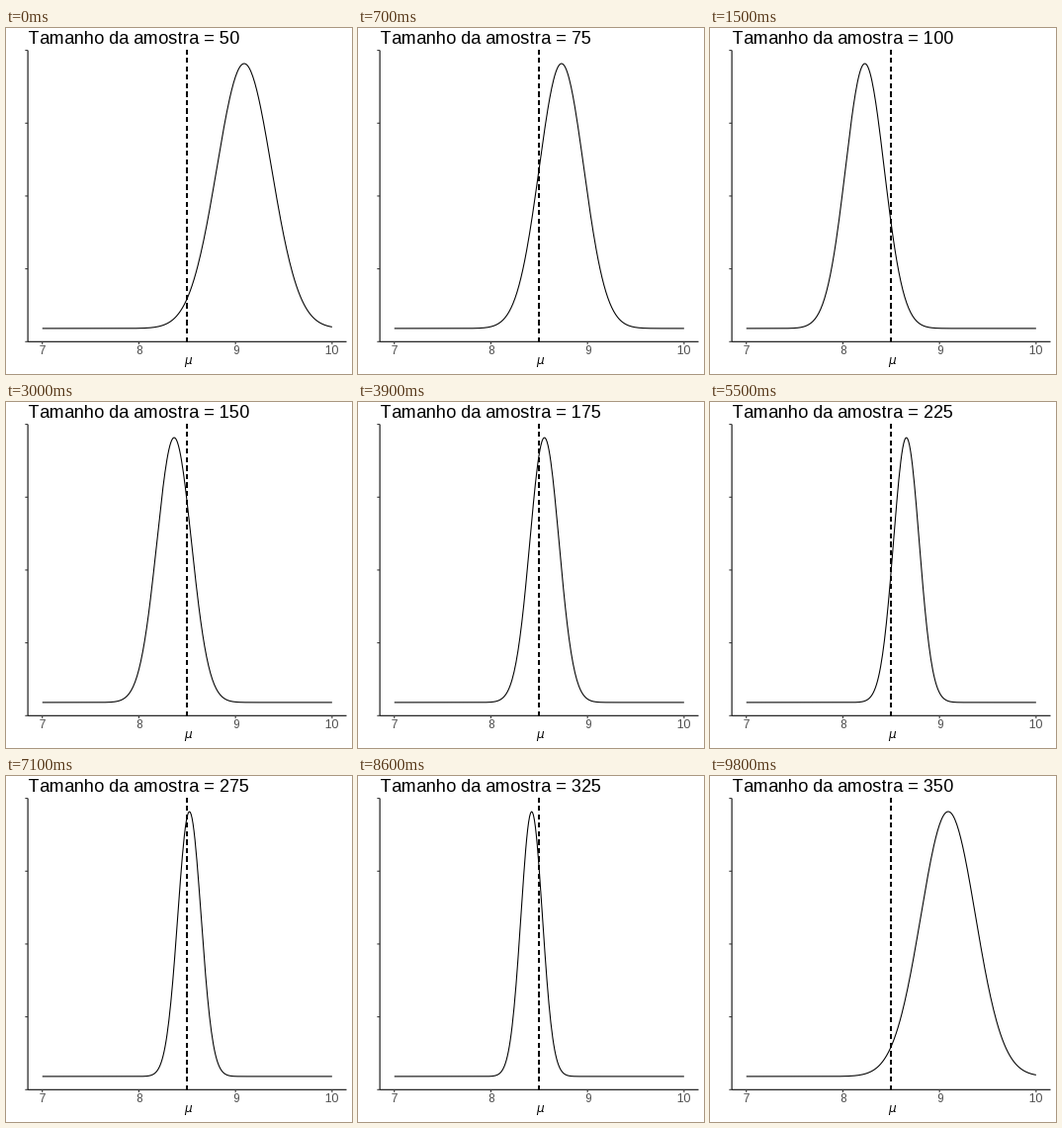
A matplotlib script for the animation above (10 s loop, 350x350 px).

```python
import numpy as np
import matplotlib as mpl
import matplotlib.pyplot as plt
from matplotlib.animation import FuncAnimation
from matplotlib.patches import Rectangle

SIZE, DPI = 350, 100
PX = 72 / DPI  # points per pixel
LEFT, RIGHT, TOP, BOTTOM = 22.1, 344.5, 22.6, 317.3
LINE = 1.07

mpl.rcParams.update({
    "font.family": "Liberation Sans",
    "text.hinting": "force_autohint",
    "text.hinting_factor": 1,
    "text.kerning_factor": 6,
    "path.snap": False,
})

SAMPLES = list(range(50, 351, 25))
MEANS = [9.09, 8.731, 8.227, 8.365, 8.381, 8.554, 8.594,
         8.657, 8.511, 8.523, 8.54, 8.422, 8.46]
SIGMA = 2
TITLE_STARTS = list(range(6, 79, 8)) + [86, 93]
CURVE_STARTS = list(range(7, 80, 8)) + [86, 93]
WRAP = 98       # the curve returns to the first sample here
LEVELS = 13     # the last likelihood underflows to this many steps
MU = np.linspace(7, 10, 301)


def x_pix(value):
    unit = (RIGHT - LEFT) / 3.3
    return LEFT + (value - 6.85) * unit


def y_pix(fraction):
    return BOTTOM - fraction * (BOTTOM - TOP)


def likelihood(i):
    sd = SIGMA / np.sqrt(SAMPLES[i])
    return np.exp(-0.5 * ((MU - MEANS[i]) / sd) ** 2)


def curve_and_ticks(i):
    """Heights of the curve and of the y ticks as fractions of the panel."""
    if i < len(SAMPLES) - 1:
        return (likelihood(i) + 0.05) / 1.1, np.linspace(0, 1, 5)
    span = LEVELS + 2
    ticks = np.arange(5) * round(span / 4) / span
    ticks[-1] = 1
    return (np.round(likelihood(i) * LEVELS) + 1) / span, ticks


fig = plt.figure(figsize=(SIZE / DPI, SIZE / DPI), dpi=DPI, facecolor="white")
ax = fig.add_axes([0, 0, 1, 1])
ax.set_xlim(0, SIZE)
ax.set_ylim(SIZE, 0)
ax.axis("off")


def line(xs, ys, color="black"):
    return ax.plot(xs, ys, color=color, lw=LINE * PX, solid_capstyle="butt",
                   solid_joinstyle="round", snap=False)[0]


def label(x, y, text, size, **style):
    return ax.text(x, y, text, fontsize=size * PX, va="baseline", **style)


# Axes
line([LEFT, RIGHT], [BOTTOM, BOTTOM])
line([LEFT, LEFT], [TOP, BOTTOM])
for value in range(7, 11):
    x = x_pix(value)
    line([x, x], [BOTTOM, BOTTOM + 2.75], "#333333")
    label(x, 330, str(value), 12, color="#4d4d4d", ha="center")
label(184.5, 340, "μ", 12, family="DejaVu Sans", style="oblique", ha="center")

# Reference line at 8.5, dashes running up from the axis on whole pixels
ref = int(x_pix(8.5)) - 1
dash = 4 * LINE
for start in np.arange(BOTTOM, TOP, -2 * dash):
    low = np.ceil(start)
    high = np.floor(max(start - dash, TOP))
    ax.add_patch(Rectangle((ref, high), 2, low - high, color="black", lw=0,
                           zorder=3))

y_ticks = [line([LEFT - 2.75, LEFT], [0, 0], "#333333") for _ in range(5)]
curve = line(x_pix(MU), x_pix(MU))
title = label(22, 16, "", 18, color="black", ha="left")


def stage(starts, frame):
    return sum(frame >= s for s in starts)


def update(frame):
    title.set_text(f"Tamanho da amostra = {SAMPLES[stage(TITLE_STARTS, frame)]}")
    i = 0 if frame >= WRAP else stage(CURVE_STARTS, frame)
    heights, ticks = curve_and_ticks(i)
    curve.set_ydata(y_pix(heights))
    for mark, t in zip(y_ticks, ticks):
        mark.set_ydata([y_pix(t)] * 2)
    return [title, curve, *y_ticks]


anim = FuncAnimation(fig, update, frames=100, interval=100,
                     init_func=lambda: update(0), repeat=True, repeat_delay=0)
plt.show()
```
